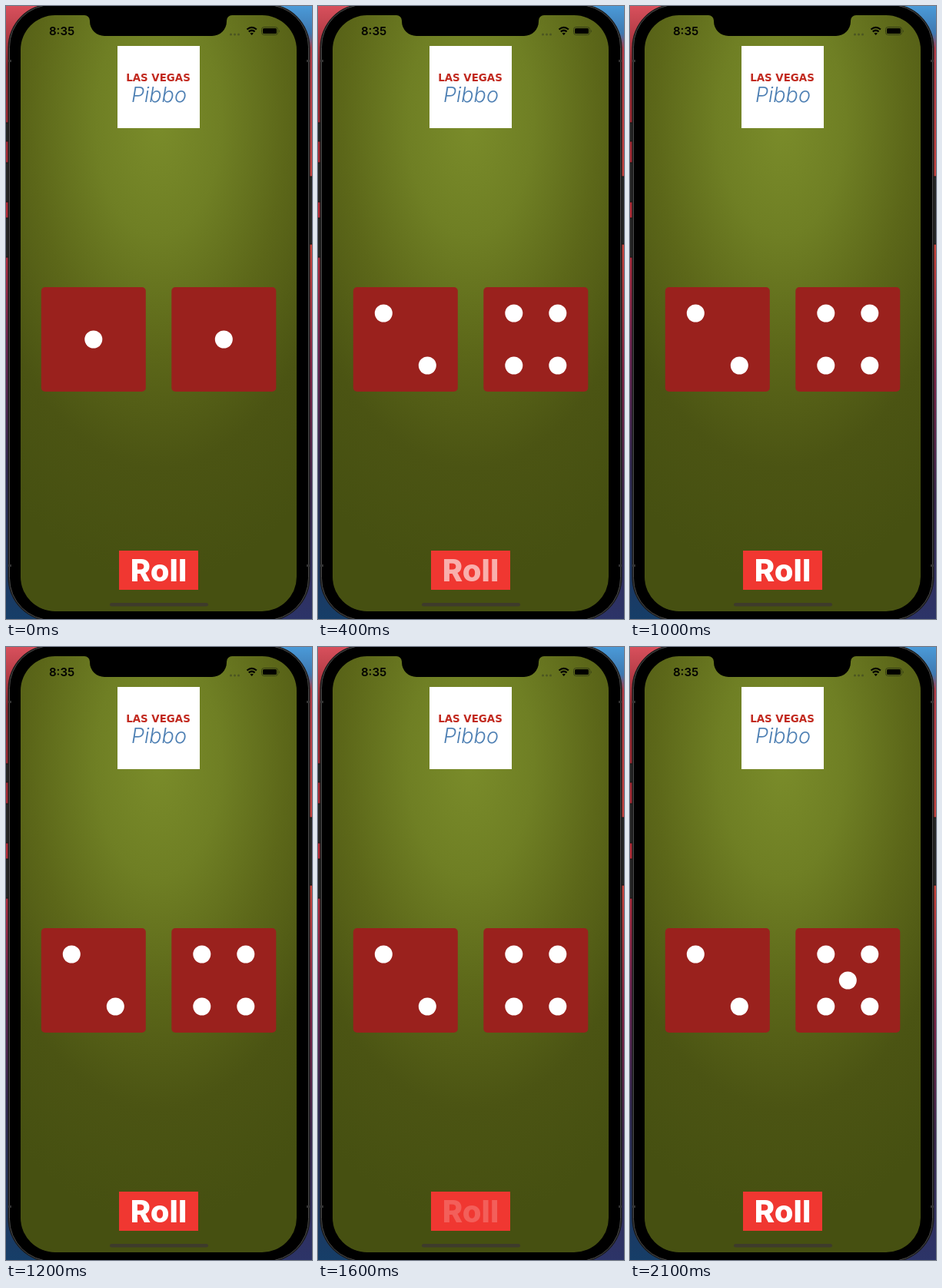
Recreate the animation shown at these times as an HTML page. Size 398 by 798 pixels, loop 2.2 s.

```html
<!DOCTYPE html>
<html lang="en">
<head>
<meta charset="utf-8">
<title>Dice roll</title>
<style>
  html, body { margin: 0; width: 100%; height: 100%; overflow: hidden; background: #000; }
  svg { display: block; width: 100vw; height: 100vh; }
  .ui { font-family: Inter, "Liberation Sans", sans-serif; }
</style>
</head>
<body>
<svg viewBox="0 0 398 798" xmlns="http://www.w3.org/2000/svg">
  <defs>
    <radialGradient id="felt" gradientUnits="userSpaceOnUse" cx="0" cy="0" r="1"
                    gradientTransform="translate(198 150) scale(330 600)">
      <stop offset="0" stop-color="#7a8c2a"/>
      <stop offset=".25" stop-color="#6f7f24"/>
      <stop offset=".5" stop-color="#5c6719"/>
      <stop offset=".75" stop-color="#4b5413"/>
      <stop offset="1" stop-color="#465011"/>
    </radialGradient>
    <linearGradient id="wallLeft" x2="0" y2="1">
      <stop offset="0" stop-color="#d8505c"/>
      <stop offset=".1" stop-color="#8c262e"/>
      <stop offset=".38" stop-color="#b82c38"/>
      <stop offset=".55" stop-color="#6e2450"/>
      <stop offset=".75" stop-color="#302850"/>
      <stop offset="1" stop-color="#163e68"/>
    </linearGradient>
    <linearGradient id="wallRight" x2="0" y2="1">
      <stop offset="0" stop-color="#4a9ad8"/>
      <stop offset=".045" stop-color="#3f78b0"/>
      <stop offset=".07" stop-color="#b03c48"/>
      <stop offset=".38" stop-color="#c8443a"/>
      <stop offset=".6" stop-color="#7c2244"/>
      <stop offset=".8" stop-color="#38264c"/>
      <stop offset="1" stop-color="#2c3468"/>
    </linearGradient>
  </defs>

  <rect width="199" height="798" fill="url(#wallLeft)"/>
  <rect x="199" width="199" height="798" fill="url(#wallRight)"/>

  <!-- phone body and side buttons -->
  <g fill="#262626" stroke="#111">
    <rect x="-2" y="152" width="7" height="24"/>
    <rect x="-2" y="204" width="7" height="51"/>
    <rect x="-2" y="276" width="7" height="51"/>
    <rect x="393" y="222" width="7" height="88"/>
  </g>
  <rect x="2.500" y="-3" width="393" height="804" rx="57" fill="#1b1b1b"/>
  <rect x="4.500" y="-1.500" width="389" height="801" rx="55" fill="#000" stroke="#4b4b4b"/>
  <path d="M3 71.500h4M391 71.500h4M3 728.500h4M391 728.500h4" stroke="#333" stroke-width="3"/>

  <!-- screen -->
  <rect x="19" y="12" width="359" height="776" rx="45" fill="url(#felt)"/>
  <path d="M102 11v1a7 7 0 0 1 7 7v1a19 19 0 0 0 19 19h140a19 19 0 0 0 19-19v-1a7 7 0 0 1 7-7v-1z"/>

  <!-- status bar -->
  <text class="ui" x="56" y="38" font-size="15" font-weight="600">8:35</text>
  <path d="M292.500 37h15" stroke="#4c5622" stroke-width="3" stroke-linecap="round" stroke-dasharray="0 5"/>
  <path d="M313.500 30.500q6.200-5.400 12.400 0M315.800 33.400q3.900-3.300 7.800 0"
        fill="none" stroke="#000" stroke-width="2.200"/>
  <path d="M319.700 38l-2.200-2.400q2.200-1.700 4.400 0z"/>
  <rect x="332.500" y="27.500" width="21" height="10" rx="3" fill="none" stroke="#343c14"/>
  <rect x="334" y="29" width="18" height="7" rx="1.500"/>
  <path d="M355 30.500q1.500 2 0 4z" fill="#343c14"/>

  <!-- title -->
  <rect x="145" y="52" width="107" height="107" fill="#fff"/>
  <g text-anchor="middle">
    <text x="198" y="98" font-size="13.400" font-weight="700" fill="#c22a20"
          font-family="'DejaVu Sans', sans-serif">LAS VEGAS</text>
    <text class="ui" x="199" y="125" font-size="27" font-weight="300" font-style="italic"
          fill="#4d7fb3">Pibbo</text>
  </g>

  <g id="dice"></g>

  <rect x="147" y="709" width="103" height="51" fill="#f03731"/>
  <text id="label" class="ui" x="198.500" y="749" font-size="40" font-weight="800" fill="#fff"
        text-anchor="middle">Roll</text>
  <rect x="135" y="777" width="128" height="4.500" rx="2.250" fill="#3e3b2b"/>
</svg>

<script>
const LOOP = 2200, STEP = 100;
const FADE = 300;
const presses = [
  { down: 200, up: 300 },
  { down: 1600, up: 1700 }
];
const rolls = [
  { at: 0, faces: [1, 1] },
  { at: 300, faces: [2, 4] },
  { at: 1700, faces: [2, 5] }
];

const svgNode = (name, attrs, parent) => {
  const node = document.createElementNS("http://www.w3.org/2000/svg", name);
  for (const key in attrs) node.setAttribute(key, attrs[key]);
  return parent.appendChild(node);
};

// Each pip knows which faces it shows on.
function makeDie(cx) {
  const parent = document.getElementById("dice");
  svgNode("rect", { x: cx - 68, y: 366, width: 136, height: 136, rx: 5, fill: "#9a211d" }, parent);
  const pip = (dx, dy, shows) => ({
    shows,
    node: svgNode("circle", { cx: cx + 28.5 * dx, cy: 434 + 34 * dy, r: 11.5, fill: "#fff" }, parent)
  });
  return [
    pip(0, 0, face => face % 2 === 1),
    pip(-1, -1, face => face >= 2),
    pip(1, 1, face => face >= 2),
    pip(1, -1, face => face >= 4),
    pip(-1, 1, face => face >= 4)
  ];
}

const dice = [113.8, 283.3].map(makeDie);
const label = document.getElementById("label");

function labelOpacity(t) {
  const press = presses.filter(p => t >= p.down).pop();
  if (!press) return 1;
  if (t < press.up) return 0.2;
  const k = Math.min(1, (t - press.up + STEP / 2) / FADE);
  return 0.2 + 0.8 * k * k * (3 - 2 * k);
}

function draw(time) {
  const t = Math.floor((time % LOOP) / STEP) * STEP;
  const { faces } = rolls.filter(r => t >= r.at).pop();
  dice.forEach((pips, i) => pips.forEach(({ node, shows }) =>
    node.setAttribute("visibility", shows(faces[i]) ? "visible" : "hidden")));
  label.setAttribute("fill-opacity", labelOpacity(t));
}

const start = performance.now();
function tick() {
  draw(performance.now() - start);
  requestAnimationFrame(tick);
}
tick();
</script>
</body>
</html>
```
